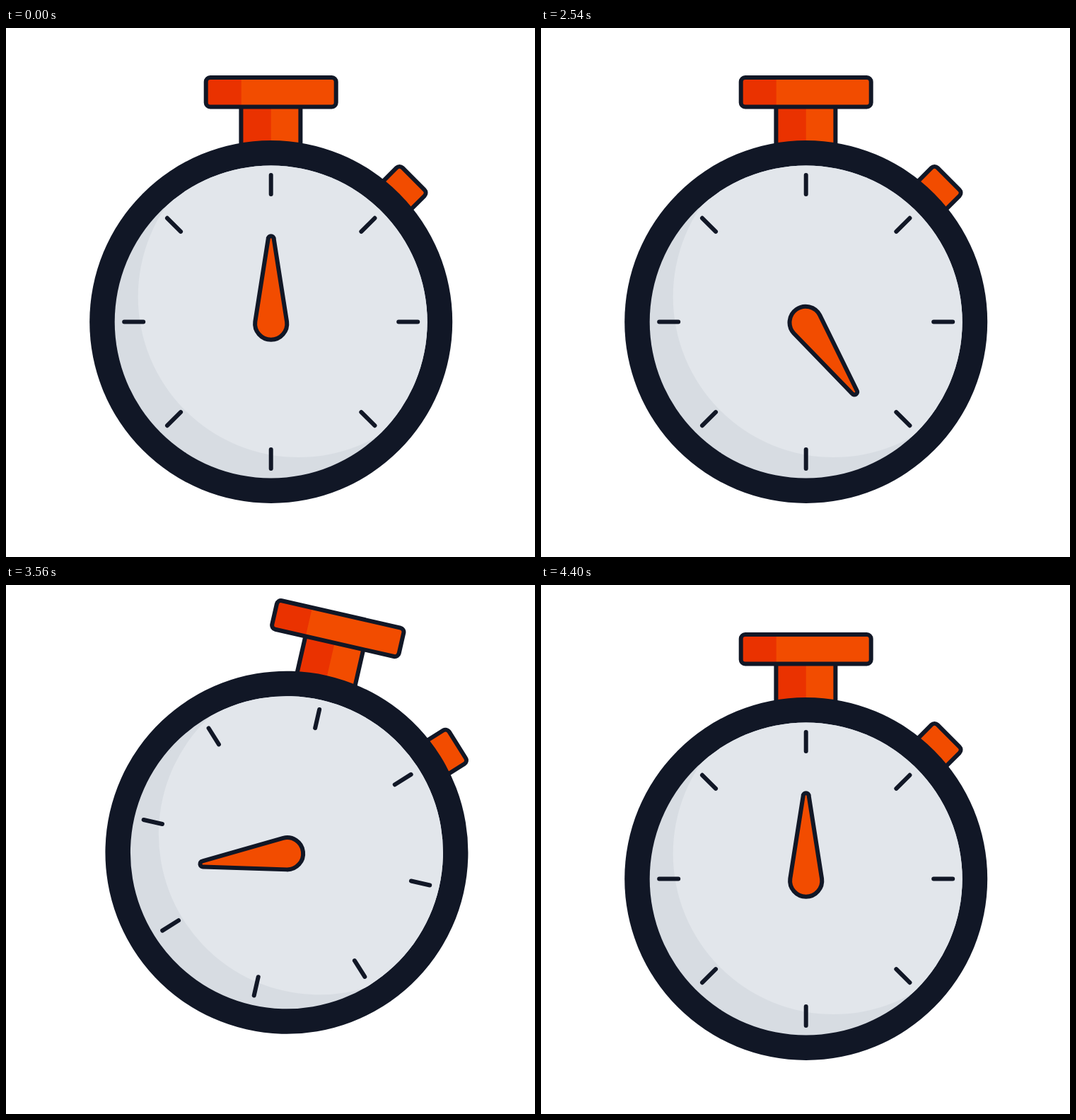
These frames come from a looping animation (748x748 px, 4.43 s). An HTML page:

```html
<!DOCTYPE html>
<html lang="en">
<head>
<meta charset="utf-8">
<title>Stopwatch</title>
<style>
  html, body { margin: 0; width: 100%; height: 100%; overflow: hidden; background: #fff; }
  svg { display: block; width: 100%; height: 100%; }
  .line { stroke: #111726; stroke-width: 6; stroke-linecap: round; stroke-linejoin: round; }
  .orange { fill: #f24c00; }
  .red { fill: #ea3200; }
  .dark { fill: #111726; }
  .none { fill: none; }
</style>
</head>
<body>
<svg viewBox="0 0 748 748">
  <defs>
    <clipPath id="face"><circle r="221"/></clipPath>
  </defs>
  <!-- everything is drawn around the centre of the dial -->
  <g id="body">
    <path class="orange" d="M-42.3-304H41.7V-245H-42.3Z"/>
    <path class="red" d="M-42.3-304H0V-245H-42.3Z"/>
    <path class="line none" d="M-42.3-304V-245M41.7-304V-245"/>
    <rect class="orange" x="-92" y="-345.5" width="184" height="41.5" rx="6"/>
    <path class="red" d="M-42-345.5H-86a6 6 0 0 0-6 6v29.5a6 6 0 0 0 6 6H-42Z"/>
    <rect class="line none" x="-92" y="-345.5" width="184" height="41.5" rx="6"/>
    <g transform="rotate(45)">
      <rect id="button" class="line orange" x="-28.5" y="-285.5" width="56" height="57" rx="6"/>
    </g>
    <circle class="dark" r="256.5"/>
    <circle r="221" fill="#d7dce2"/>
    <circle cx="39" cy="-35.5" r="227" fill="#e2e6eb" clip-path="url(#face)"/>
    <g id="ticks"></g>
    <g transform="translate(0 1.7)">
      <path id="hand" class="line orange" d="M-4-119L-22.4-2A22.6 22.6 0 1 0 22.4-2L4-119A4 4 0 0 0-4-119Z"/>
    </g>
  </g>
</svg>
<script>
  const LOOP = 4430, START = 2030, STEP = 30;
  const $ = id => document.getElementById(id);
  const clamp = p => Math.min(1, Math.max(0, p));

  // smooth 0 to 1 between two times
  const ramp = (t, from, to) => (1 - Math.cos(Math.PI * clamp((t - from) / (to - from)))) / 2;

  // smooth rise to 1 at the peak, then back to 0
  const bump = (t, from, peak, to) => ramp(t, from, peak) - ramp(t, peak, to);

  for (let a = 0; a < 360; a += 45) {
    $('ticks').insertAdjacentHTML('beforeend',
      `<path class="line" d="M0-207.5V-180.5" transform="rotate(${a})"/>`);
  }

  function pose(t) {
    const tap = bump(t, 2000, 2120, 2300);
    const rebound = bump(t, 2120, 2300, 2490);
    const jump = bump(t, 3110, 3540, 3865);
    const recoil = bump(t, 3540, 3865, 4200);
    const settle = bump(t, 3865, 4185, 4400);
    const spin = clamp((t - 2180) / 1611) ** 1.07;
    return {
      x: 22.5 * jump - 6.6 * recoil,
      y: 17.5 * tap - 13 * rebound - 37.7 * jump + 9.8 * recoil - 7 * settle,
      turn: 13 * jump - 0.7 * recoil,
      press: 20.5 * (tap + recoil),
      hand: 720 * spin + 10.5 * bump(t, 3760, 3860, 4090)
    };
  }

  function draw(now) {
    const t = now % LOOP;
    // the motion advances in fixed steps
    const { x, y, turn, press, hand } =
      pose(t < START ? 0 : t - (t - START) % STEP);
    $('body').setAttribute('transform',
      `translate(${374.7 + x} ${415.5 + y}) rotate(${turn})`);
    $('button').setAttribute('transform', `translate(0 ${press})`);
    $('hand').setAttribute('transform', `rotate(${hand})`);
  }

  function loop() {
    draw(performance.now());
    requestAnimationFrame(loop);
  }
  loop();
</script>
</body>
</html>
```
